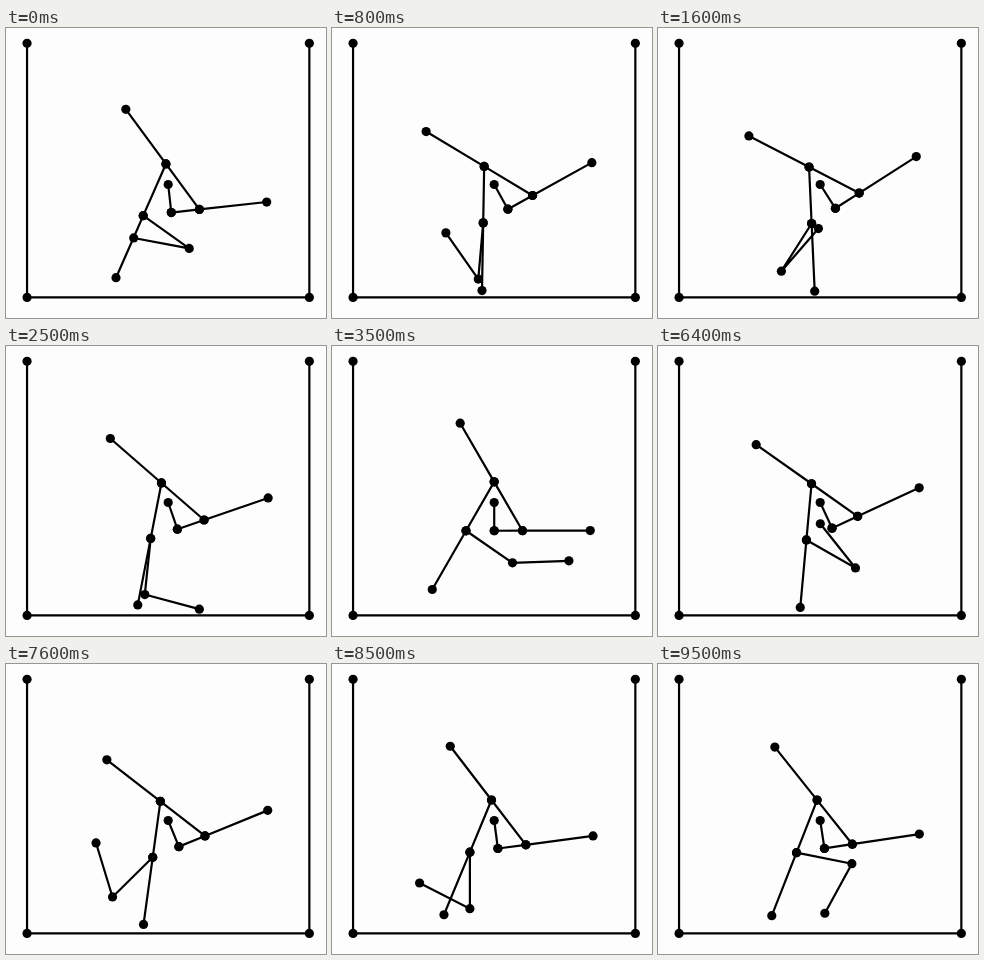
Write an HTML page with a canvas that moves like this. It is 320 px wide and 290 px high and loops after 9600 ms.

```html
<!DOCTYPE html>
<html lang="en">
<head>
<meta charset="utf-8">
<title>Compound pendulum</title>
<style>
  html, body { margin: 0; width: 100%; height: 100%; overflow: hidden; background: #fefdfe; }
  canvas { display: block; width: 320px; height: 290px; }
</style>
</head>
<body>
<canvas id="stage" width="320" height="290"></canvas>
<script>
const LOOP = 9600, STEP = 100;
const UNIT = 28.23, PIVOT = [162.2, 156.5], ROD = 2, ARM = 2.4, DOT = 4.6;
const ctx = document.getElementById('stage').getContext('2d');

// Key poses: time in ms, then the angles of body, upper rod and lower rod in
// degrees, counterclockwise; the rods are measured from straight down
const poses = [
  [0, 6.3, 54.5, 259.3],
  [800, 29, -5, 215],
  [1600, 32.6, -32.4, 139],
  [2500, 19, -6, 75],
  [3500, 0.1, 55.4, 92],
  [4000, -0.5, 38, 83],
  [4700, 12.7, -69.3, 82.8],
  [5400, 25, -10, 78],
  [5900, 27.4, 45, 130],
  [6400, 24.8, 60.3, 218.5],
  [7000, 24.2, 8, 240],
  [7600, 22.2, -45.4, 197],
  [8500, 7.5, 0, 243],
  [9000, 2.6, 28, 292],
  [9500, 8.6, 78.7, 331.4]
];

function slope(i, k) {
  const a = poses[Math.max(i - 1, 0)], b = poses[Math.min(i + 1, poses.length - 1)];
  return (b[k] - a[k]) / (b[0] - a[0]);
}

// Cubic Hermite curve through column k of the poses, in radians
function angle(k, t) {
  let i = 0;
  while (i < poses.length - 2 && t >= poses[i + 1][0]) i++;
  const a = poses[i], b = poses[i + 1];
  const span = b[0] - a[0], s = (t - a[0]) / span, r = 1 - s;
  const degrees = r * r * (1 + 2 * s) * a[k] + s * s * (3 - 2 * s) * b[k]
    + span * s * r * (r * slope(i, k) - s * slope(i + 1, k));
  return degrees * Math.PI / 180;
}

// Point at a given length and direction; zero is straight down
function reach([x, y], length, dir) {
  return [x + length * Math.sin(dir), y + length * Math.cos(dir)];
}

function chain(...units) {
  const points = units.map(([x, y]) => [PIVOT[0] + x * UNIT, PIVOT[1] + y * UNIT]);
  ctx.beginPath();
  for (const p of points) ctx.lineTo(...p);
  ctx.stroke();
  for (const [x, y] of points) {
    ctx.beginPath();
    ctx.arc(x, y, DOT, 0, 2 * Math.PI);
    ctx.fill();
  }
}

function draw(t) {
  ctx.fillStyle = '#fefdfe';
  ctx.fillRect(0, 0, 320, 290);
  ctx.fillStyle = ctx.strokeStyle = '#000';
  ctx.lineWidth = 2.2;
  chain([-5, -5], [-5, 4], [5, 4], [5, -5]);

  // Walk around the triangle; each corner carries an arm straight on
  const turn = angle(1, t), third = 2 * Math.PI / 3;
  const foot = reach([0, 0], 1, turn);
  let dir = turn + Math.PI / 2, from = foot, corner = reach(foot, 1, dir);
  chain([0, 0], foot);
  for (let i = 0; i < 3; i++) {
    chain(from, corner, reach(corner, ARM, dir));
    if (i === 2) break;
    dir += third;
    from = corner;
    corner = reach(corner, 2, dir);
  }

  const elbow = reach(corner, ROD, angle(2, t));
  chain(corner, elbow, reach(elbow, ROD, angle(3, t)));
}

const start = performance.now();
function tick() {
  const t = (performance.now() - start) % LOOP;
  draw(Math.floor(t / STEP) * STEP);
  requestAnimationFrame(tick);
}
tick();
</script>
</body>
</html>
```
